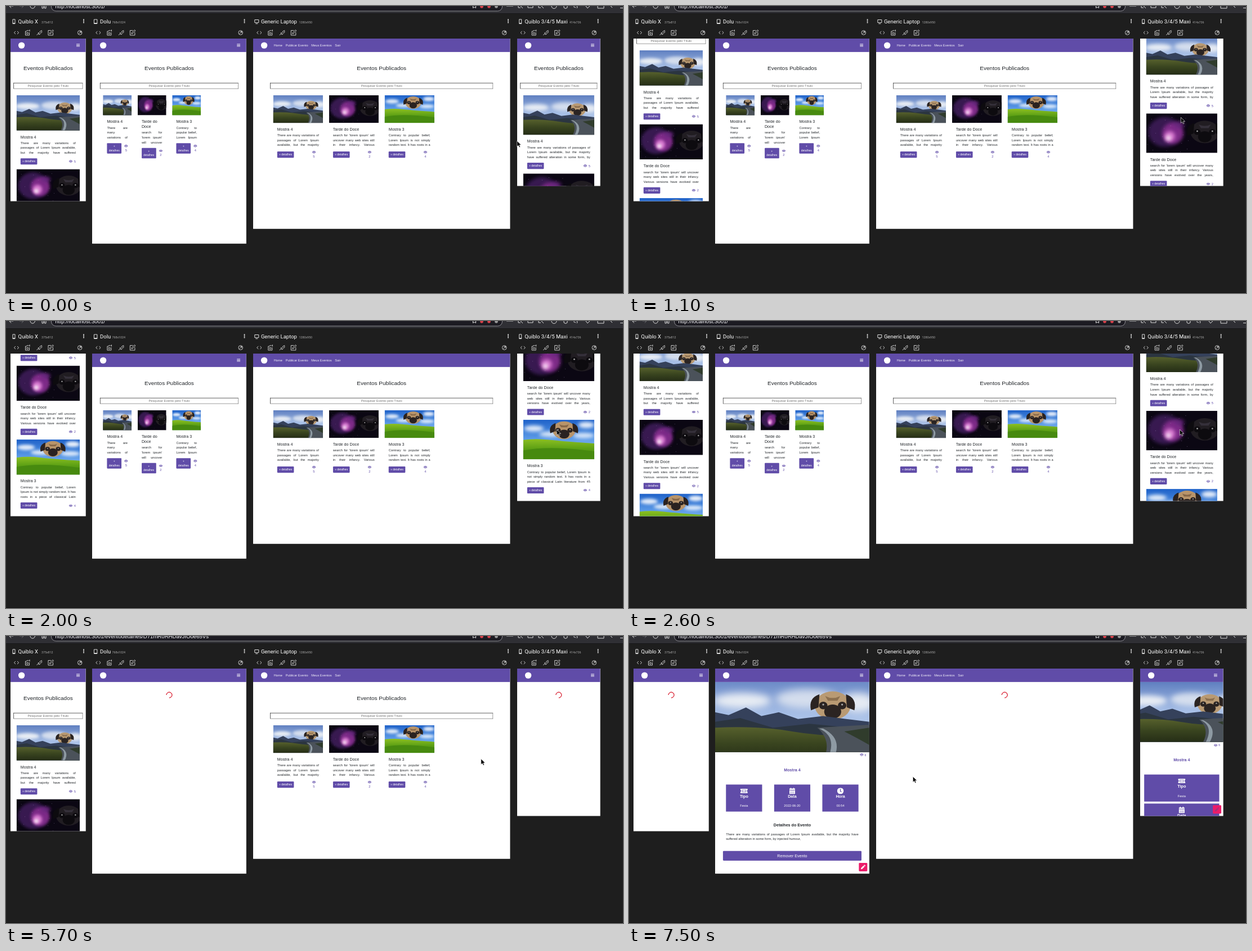
Recreate the animation shown at these times as an HTML page. Size 1096 by 511 pixels, loop 8000 ms.

```html
<!DOCTYPE html>
<html lang="pt">
<head>
<meta charset="utf-8">
<title>Eventos Publicados</title>
<style>
html, body { margin: 0; width: 100%; height: 100%; overflow: hidden; background: #1e1e1e; }
#stage { position: relative; width: 1096px; height: 511px; overflow: hidden; background: #1e1e1e; }
#chrome, #cursor { position: absolute; left: 0; top: 0; overflow: visible; }
.screen {
  position: absolute; top: 58px; overflow: hidden; background: #fff; color: #212529;
  transform: scale(.3566); transform-origin: 0 0;
  font: 16px/24px "Liberation Sans", Arial, sans-serif;
}
.page, .view { position: absolute; inset: 0; }
.screen svg { display: block; }
nav { position: absolute; top: 0; left: 0; right: 0; height: 67px; background: #604ca8; color: #f4f2fa; }
nav i { position: absolute; left: 39px; top: 17.5px; width: 32px; height: 32px; border-radius: 50%; background: #fff; }
nav svg { position: absolute; right: 30px; top: 26px; }
nav div { position: absolute; left: 103px; top: 21.5px; display: flex; gap: 16px; white-space: nowrap; }
.heading { position: absolute; top: 132px; width: 100%; text-align: center; font-size: 28px; line-height: 33.6px; }
.search {
  position: absolute; top: 221px; height: 30px; box-sizing: border-box; border: 2px inset #767676;
  padding: 1px; text-align: center; color: #757575;
}
.cards { position: absolute; top: 283px; display: flex; gap: 30px; align-items: flex-start; }
.phone .cards { flex-direction: column; gap: 3px; }
.body { padding: 20px; }
.body b { display: block; font-weight: 400; font-size: 20px; margin-bottom: 7px; }
.body p { height: 72px; overflow: hidden; margin: 0 0 16px; text-align: justify; }
.foot { display: flex; align-items: center; justify-content: space-between; }
.btn {
  box-sizing: border-box; padding: 5px 9px; border-radius: 3px; background: #604ca8; color: #fff;
  font-size: 14px; line-height: 21px; text-align: center;
}
.tablet .btn { width: 72px; }
.count { display: flex; align-items: center; gap: 7px; line-height: 19px; color: #604ca8; }
.wide .card .count { flex-direction: column; gap: 0; margin-right: 16px; }
.wide .count svg { height: 19px; }
.tablet .card .count { margin-right: -1.5px; }
.spin {
  position: absolute; left: calc(50% - 16px); top: 116px; width: 32px; height: 32px; box-sizing: border-box;
  border: 4px solid #dc3545; border-right-color: transparent; border-radius: 50%;
}
.photo { position: absolute; top: 67px; left: 0; }
.detail .count { position: absolute; right: 16px; font-size: 14px; gap: 5px; }
.mid { position: absolute; width: 100%; text-align: center; font-size: 20px; font-weight: 700; }
.box { position: absolute; height: 135px; background: #604ca8; color: #fff; text-align: center; }
.box svg { margin: 16px auto 0; }
.box b { display: block; font-size: 20px; line-height: 22px; margin-bottom: 25px; }
.about { position: absolute; left: 54px; width: 660px; top: 815px; margin: 0; text-align: justify; }
.remove {
  position: absolute; left: 39px; width: 690px; top: 911px; height: 48px; border-radius: 4px;
  background: #604ca8; color: #fff; font-size: 20px; line-height: 48px; text-align: center;
}
.fab { position: absolute; right: 10px; bottom: 12px; padding: 9px; border-radius: 4px; background: #ec1c69; color: #fff; }
.phone .fab { color: #a8327a; }
</style>
</head>
<body>
<div id="stage"></div>
<script>
const LOOP = 8000, SCALE = .3566;

const devices = [
  { name: 'Quiblo X', size: '375x812', x: 8, sizeX: 63, kind: 'phone', edge: 15, card: 315, pic: 175.8 },
  { name: 'Dolu', size: '768x1024', x: 153.4, sizeX: 188.5, kind: 'wide tablet', edge: 39, card: 142.5, pic: 100, hero: 350 },
  { name: 'Generic Laptop', size: '1280x950', x: 439.3, sizeX: 520.5, kind: 'wide laptop', edge: 85, card: 247.5, pic: 138 },
  { name: 'Quiblo 3/4/5 Maxi', size: '414x736', x: 907.7, sizeX: 1001, kind: 'phone', edge: 15, card: 354, pic: 197.5, hero: 300 },
];
for (const d of devices) [d.w, d.h] = d.size.split('x').map(Number);

const events = [
  { title: 'Mostra 4', views: 5, photo: 'valley', text: 'There are many variations of passages of Lorem Ipsum available, but the majority have suffered alteration in some form, by injected humour,' },
  { title: 'Tarde do Doce', views: 2, photo: 'nebula', text: "search for 'lorem ipsum' will uncover many web sites still in their infancy. Various versions have evolved over the years, sometimes by accident, sometimes on purpose" },
  { title: 'Mostra 3', views: 4, photo: 'meadow', text: 'Contrary to popular belief, Lorem Ipsum is not simply random text. It has roots in a piece of classical Latin literature from 45 BC, making it over 2000 years old.' },
];

// Step tables: [time, ...values], each row held until the next one.
const scrolls = {
  0: [[0, 0], [800, 8], [900, 24.5], [1000, 57], [1100, 80], [1200, 86], [1400, 110], [1500, 168], [1600, 192],
      [1700, 204], [1800, 209], [2000, 211], [2300, 198], [2400, 156], [2500, 125], [2600, 114.6], [4400, 0]],
  3: [[0, 0], [800, 15], [900, 42.5], [1000, 85], [1100, 107], [1400, 150], [1500, 217.8], [1600, 245],
      [1700, 258], [1800, 261.7], [2300, 235], [2400, 185], [2500, 150], [2600, 138.3], [4400, 0]],
};
const views = [
  [[0, 'list'], [6300, 'load']],
  [[0, 'list'], [4700, 'load'], [6700, 'detail']],
  [[0, 'list'], [6300, 'load']],
  [[0, 'list'], [4700, 'load'], [6300, 'detail']],
];
const pointer = [[0, 907.5, 240], [300, 915, 236], [400, 935, 226], [500, 955, 214], [600, 970, 204], [700, 978, 199],
  [800, 980, 198], [1400, 978, 193], [4400, 940, 284], [5200, 872, 223], [5700, 843.5, 218.5],
  [6300, 600, 22], [6700, 560, 150], [7500, 504, 250]];
const turns = [[0, 0], [4700, 40], [5200, 250], [5700, 135], [6300, 60], [6700, 250], [7500, 135]];
const urls = [[0, ''], [5700, 'eventodetalhes/D71mR0RHDavJIO0e65Vs']];

const at = (table, t) => table.findLast(row => row[0] <= t).slice(1);
const svg = (w, h, inner, attrs = '') => `<svg width="${w}" height="${h}" ${attrs}>${inner}</svg>`;
const shape = (d, fill) => `<path d="${d}" fill="${fill}"/>`;
const line = (d, attrs = '') => `<path d="${d}" fill="none" stroke="#ddd" ${attrs}/>`;

// Photos, simplified on a 160 x 90 plate
const dog = (x, y, s, fur, dark, shade) => `<g transform="translate(${x} ${y}) scale(${s})">
  <ellipse rx="19" ry="15" fill="${fur}"/>
  ${shape('M-14 -12Q-26 -8 -23 5L-15 2Z', dark)}${shape('M14 -12Q26 -8 23 5L15 2Z', dark)}
  ${shape('M-8 -10Q0 -6 8 -10L5 -5H-5Z', shade)}
  <ellipse cx="-10" cy="0" rx="4.5" ry="4" fill="${dark}"/><ellipse cx="10" cy="0" rx="4.5" ry="4" fill="${dark}"/>
  <ellipse cy="6.5" rx="9" ry="7.5" fill="${dark}"/>
  <circle cx="-10" cy="-1" r="1" fill="#aaa"/><circle cx="10" cy="-1" r="1" fill="#aaa"/></g>`;
const blur = (cx, cy, rx, ry, fill, o = 1) => `<ellipse cx="${cx}" cy="${cy}" rx="${rx}" ry="${ry}" fill="${fill}" opacity="${o}" filter="url(#soft)"/>`;
const plate = fill => `<rect width="160" height="90" fill="${fill}"/>`;
const grad = (id, ...stops) => `<linearGradient id="${id}" x2="0" y2="1">${stops.map((c, i) =>
  `<stop offset="${i / (stops.length - 1)}" stop-color="${c}"/>`).join('')}</linearGradient>`;

const photos = {
  valley: plate('url(#dawn)') + blur(28, 28, 30, 8, '#f2f4f7', .9) + blur(95, 26, 32, 10, '#e6ebf3', .8) +
    blur(148, 30, 18, 10, '#eef1f5', .9) +
    dog(122, 33, .98, '#b99a73', '#2b2422', '#8c7050') +
    shape('M0 40L14 43L32 35L48 44L66 40L86 47L112 44L136 47L160 50V90H0Z', '#35415b') +
    shape('M0 50L26 46L60 56L98 52L160 58V90H0Z', '#2b3540') +
    shape('M0 56Q46 54 80 60T160 64V90H0Z', 'url(#grass)') +
    shape('M106 56L160 53V90H112Q122 70 106 56Z', '#4b525a') +
    shape('M108 57Q128 66 116 90H122Q134 68 112 57Z', '#8e9aa3') +
    shape('M134 60L160 56V74Q146 66 134 60Z', '#303c2c'),
  nebula: plate('#0b0713') + blur(42, 42, 38, 34, '#3c1a58', .9) + blur(60, 45, 24, 24, '#8a2f92', .85) +
    blur(53, 52, 12, 12, '#d778cf') + blur(50, 56, 5, 5, '#fff') + blur(74, 26, 12, 8, '#69277f', .8) +
    Array.from({ length: 24 }, (_, i) => `<circle cx="${i * 37 % 108}" cy="${i * 53 % 89}" r=".5" fill="#b9a2d6"/>`).join('') +
    dog(132, 42, 1.7, '#211d22', '#0d0b0f', '#35303a'),
  meadow: plate('url(#noon)') + blur(24, 20, 22, 7, '#fff', .85) + blur(62, 33, 26, 6, '#fff', .8) +
    blur(142, 12, 18, 7, '#fff', .9) + blur(136, 36, 24, 6, '#fff', .8) +
    dog(92, 24, 1.35, '#b8946a', '#2a2220', '#876747') +
    shape('M0 46Q28 42 62 46T160 54V90H0Z', 'url(#lawn)') +
    shape('M0 70Q60 58 160 72V90H0Z', '#478a0f'),
};
const photo = (id, w, h, fit, cls = '') =>
  svg(w, h, `<use href="#${id}"/>`, `class="${cls}" viewBox="0 0 160 90" preserveAspectRatio="${fit}"`);

// Site
const eye = svg(18, 14, '<path fill-rule="evenodd" fill="currentColor" d="M0 7Q9-6 18 7Q9 20 0 7ZM9 2.2a4.8 4.8 0 1 0 .01 0ZM9 4.4a2.6 2.6 0 1 1-.01 0Z"/>');
const count = (n, style = '') => `<span class="count" style="${style}">${eye}<span>${n}</span></span>`;
const burger = svg(17, 15, shape('M0 0h17v3H0ZM0 6h17v3H0ZM0 12h17v3H0Z', '#fff'));
const links = '<div>' + ['Home', 'Publicar Evento', 'Meus Eventos', 'Sair'].map(s => `<span>${s}</span>`).join('') + '</div>';
const icons = {
  Tipo: '<path fill="#fff" fill-rule="evenodd" d="M0 5h36v7a4 4 0 0 0 0 8v7H0v-7a4 4 0 0 0 0-8ZM8 10v12h20V10ZM10 12h16v8H10Z"/>',
  Data: '<g transform="translate(4)"><path fill="#fff" fill-rule="evenodd" d="M0 4h5V0h4v4h10V0h4v4h5v6H0ZM0 12h28v20H0ZM5 15v3h4v-3ZM12 15v3h4v-3ZM19 15v3h4v-3ZM5 23v4h4v-4ZM12 23v4h4v-4ZM19 23v4h4v-4Z"/></g>',
  Hora: '<circle cx="18" cy="16" r="16" fill="#fff"/><path d="M18 6V17L23 21" fill="none" stroke="#604ca8" stroke-width="3.5"/>',
};
const facts = [['Tipo', 'Festa'], ['Data', '2022-06-20'], ['Hora', '00:54']];

const card = (d, e) => `<div class="card" style="width:${d.card}px">${photo(e.photo, d.card, d.pic, 'none')}
  <div class="body"><b>${e.title}</b><p>${e.text}</p>
  <div class="foot"><span class="btn">+ detalhes</span>${count(e.views)}</div></div></div>`;

const list = d => `<div class="heading">Eventos Publicados</div>
  <div class="search" style="left:${d.edge}px;right:${d.edge}px">Pesquisar Evento pelo Título</div>
  <div class="cards" style="left:${d.edge + 15}px">${events.map(e => card(d, e)).join('')}</div>`;

function detail(d) {
  const base = 67 + d.hero, phone = d.kind === 'phone';
  const box = ([label, value], i) => `<div class="box" style="${phone
    ? `left:20px;right:20px;top:${base + 162 + i * 145}px`
    : `left:${54 + i * 240}px;width:180px;top:${base + 162}px`}">${svg(36, 32, icons[label])}<b>${label}</b>${value}</div>`;
  return photo('valley', d.w, d.hero, 'xMidYMid slice', 'photo') + count(6, `top:${base + 6}px`) +
    `<div class="mid" style="top:${base + 76}px;color:#604ca8">${events[0].title}</div>` + facts.map(box).join('') +
    (phone ? '' : `<div class="mid" style="top:768px">Detalhes do Evento</div>
      <p class="about">${events[0].text}</p><div class="remove">Remover Evento</div>`) +
    `<div class="fab">${svg(24, 24, '<path fill="currentColor" d="M1 23l1.500-7L14 4.500l5.500 5.500L8 21.500ZM15.500 3l2-2q1.500-1 3 .5l2 2q1.500 1.500.500 3l-2 2Z"/>')}</div>`;
}

const screen = d => `<div class="screen ${d.kind}" style="left:${d.x}px;width:${d.w}px;height:${d.h}px"><div class="page">
  <nav><i></i>${d.kind === 'wide laptop' ? links : burger}</nav>
  <div class="view list">${list(d)}</div><div class="view load"><div class="spin"></div></div>
  <div class="view detail">${d.hero ? detail(d) : ''}</div></div></div>`;

// Browser and device frames
const gadget = d => d.kind === 'wide laptop'
  ? line('M2.500 24.500h7v5h-7ZM4 31.500h4')
  : line(d.kind === 'phone' ? 'M4 23.800h4v7.800H4ZM4 30.500h4' : 'M3 24h5.500v7.500H3ZM3 30.500h5.500');
const deviceBar = d => {
  const right = d.w * SCALE;
  return `<g transform="translate(${d.x} 0)">${gadget(d)}
    <text x="13.6" y="31.200" font-size="9.500" fill="#fff">${d.name}</text>
    <text x="${d.sizeX - d.x}" y="31" font-size="5.300" fill="#aaa">${d.size}</text>
    ${[24.2, 26.8, 29.4].map(y => `<circle cx="${right - 3.7}" cy="${y}" r="1" fill="#fff"/>`).join('')}
    <g stroke-width=".9">
    ${line('M9 45L6.300 47.500L9 50M12 45L14.700 47.500L12 50')}
    ${line('M26.500 45h2l1-1.500h2M33.500 47v5h-7v-7M32 44.500l2-2M34 42.500v3')}<circle cx="30" cy="48.500" r="1.600" fill="none" stroke="#ddd"/>
    ${line('M46.500 52l2.500-2.500M49 47l2.500 2.500M50 47.500q-2 2 0 3t3-1.500M51.500 46l2.500 2.500M52 46q1-2.500 3-1.500t-.5 3.500M54.500 44.500l1.500-1.500')}
    ${line('M72 43.500h-5v8.500h8.500v-5M69.500 49.500l.5-2L75 42.500l1.500 1.500l-5 5Z')}
    <circle cx="${right - 10.500}" cy="47.500" r="3.800" fill="none" stroke="#ddd"/>
    ${line(`M${right - 12.5} 49.500l4-4m-2.500 0h2.500v2.500`)}</g></g>`;
};

const browser = `<rect width="1096" height="13" fill="#2f2f34"/><rect y="13" width="1096" height="1" fill="#151517"/>
  <rect x="80.500" y="-15" width="801" height="24" rx="8" fill="#1c1b22" stroke="#8f8f94"/>
  ${line('M13 0H6M9 -3L6 0L9 3.500')}${line('M24 0h7M28 3.500L31 0', 'opacity=".35"')}
  ${line('M43 0a4.200 4.200 0 0 0 8.400 0')}${line('M64 -3v7h2.500v-3h2v3h2.500v-7')}
  <text id="url" x="87.500" y="3.500" font-size="9.600" fill="#fbfbfe" style="font-family:'Liberation Sans',Arial,sans-serif"></text>
  ${line('M829.500 -1v4.500l2.500-1.500l2.500 1.500v-4.500')}
  <circle cx="845" cy="1" r="2.800" fill="#d8404a"/><circle cx="858" cy="1" r="2.800" fill="#d8404a"/><circle cx="871" cy="1" r="2.800" fill="#999"/>
  ${line('M889 0h12M910 -2v5h4M914 0l4 4M927 -2v5h9v-5M946 -2v5h4M951 0l4 4M969 0a4.500 4.500 0 0 0 9 0M991 -1v4q3 3 6 0v-4M1008 1l4 2M1014 0q2 2 0 4M1029 -1l4 5l5-5M1051 -2v6h11v-6M1074 0l3 3M1091 3.500h5')}
  <rect y="510" width="1096" height="1" fill="#111"/>`;

const defs = `<defs>${grad('dawn', '#5f7fc0', '#a9c1e8', '#e8edf3')}${grad('grass', '#56602c', '#39441f', '#252d16')}
  ${grad('noon', '#1f62c9', '#5d9ce8', '#bcd9f8')}${grad('lawn', '#8cbf22', '#5b9f14', '#427f0e')}
  <filter id="soft" x="-60%" y="-60%" width="220%" height="220%"><feGaussianBlur stdDeviation="4"/></filter>
  ${Object.entries(photos).map(([id, art]) => `<g id="${id}">${art}</g>`).join('')}</defs>`;

const stage = document.getElementById('stage');
stage.innerHTML =
  svg(1096, 511, defs + browser + devices.map(deviceBar).join(''), 'id="chrome" font-family="Roboto, sans-serif"') +
  devices.map(screen).join('') +
  svg(10, 14, '<path d="M.3 .3V10.300L2.700 8.200L4.300 11.800L6 11L4.400 7.500H7.600Z" fill="#000" stroke="#fff" stroke-width=".6"/>', 'id="cursor"');

const screens = [...stage.querySelectorAll('.screen')].map(el => ({
  page: el.querySelector('.page'),
  views: ['list', 'load', 'detail'].map(name => [name, el.querySelector('.' + name)]),
  spin: el.querySelector('.spin'),
}));
const cursor = document.getElementById('cursor'), url = document.getElementById('url');

function draw(t) {
  screens.forEach((s, i) => {
    const [current] = at(views[i], t);
    for (const [name, el] of s.views) el.style.display = name === current ? '' : 'none';
    const [y] = scrolls[i] ? at(scrolls[i], t) : [0];
    s.page.style.transform = `translateY(${-y / SCALE}px)`;
    s.spin.style.transform = `rotate(${at(turns, t)[0]}deg)`;
  });
  const [x, y] = at(pointer, t);
  cursor.style.transform = `translate(${x}px, ${y}px)`;
  url.textContent = 'http://localhost:3001/' + at(urls, t)[0];
}

const start = performance.now();
function tick() {
  draw((performance.now() - start) % LOOP);
  requestAnimationFrame(tick);
}
tick();
</script>
</body>
</html>
```
